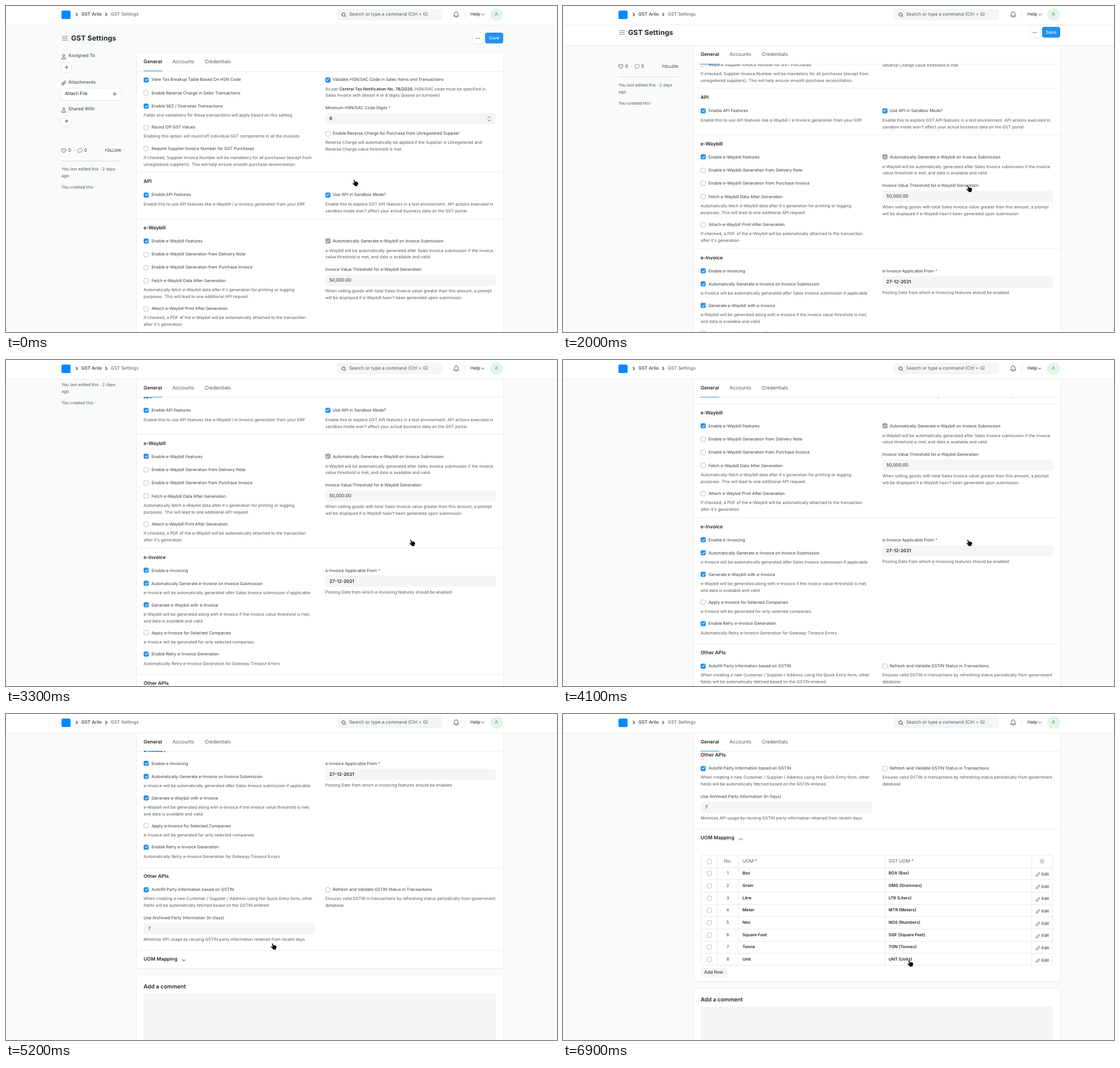
An HTML page that plays this animation: 973x575 px, repeating every 8 s.

```html
<!DOCTYPE html>
<html lang="en">
<head>
<meta charset="utf-8">
<title>GST Settings</title>
<style>
  html, body { margin: 0; width: 100%; height: 100%; overflow: hidden; background: #f9fafa; }
  body { font: 12px/20px Inter, sans-serif; color: #333c44; text-rendering: geometricPrecision; }
  #stage { position: absolute; width: 973px; height: 575px; overflow: hidden; }
  #stage div, #stage span, #stage svg { position: absolute; box-sizing: border-box; }
  /* Text is set at interface size and shown at the zoom of the stage. */
  span { white-space: pre; transform: scale(.614); transform-origin: 0 50%; }
  span b, span i { font-style: normal; font-weight: 500; color: #1f272e; }
  span i { color: #e24c4c; }
  svg { width: 1px; height: 1px; overflow: visible; fill: none; stroke-linecap: round; stroke-linejoin: round; }
  .center { transform: scale(.614) translateX(-50%); }
  .help { color: #505a62; }
  .sm { font-size: 11px; }
  .md { font-size: 13px; }
  .tab { font-size: 14px; }
  .lg { font-size: 16px; }
  .title { font-size: 20px; font-weight: 700; letter-spacing: .01em; color: #1f272e; }
  .dark { color: #1f272e; }
  .white { color: #fff; }
  .green { color: #48a36a; }
  .medium { font-weight: 500; }
  .strong { font-weight: 600; color: #1f272e; }
  .card { background: #fff; border-radius: 5px; box-shadow: 0 0 2px #1f272e26, 0 1px 2px #1f272e0d; }
  .raised { background: #fff; box-shadow: 0 0 1.5px #1f272e33, 0 .5px 1.5px #1f272e1f; }
  .input { background: #f4f5f6; border-radius: 4px; }
  .box { width: 9px; height: 9px; border: .8px solid #b9c0c6; border-radius: 2.5px; background: #fff; }
  .box.on { background: #2490ef; border: 0; }
  .box.off { background: #98a1a9; border: 0; }
</style>
</head>
<body>
<div id="stage">
  <div id="page">
    <div id="sidebar"></div>
    <div id="card" class="card" style="left:231px;top:83px;width:647px"></div>
    <div id="form"></div>
    <div id="table"></div>
    <div id="comments"></div>
  </div>
  <div id="tabs" style="left:231px;width:647px;height:32.5px;background:#fff;border-bottom:.8px solid #ebeef0;border-radius:5px 5px 0 0"></div>
  <div id="head" style="top:33.5px;width:973px;height:47px"></div>
  <div id="nav" style="width:973px;height:34px;background:#fff;border-bottom:1px solid #e9ecee"></div>
  <div id="cursor"></div>
</div>
<script>
const $ = id => document.getElementById(id);
const add = (id, ...parts) => { $(id).innerHTML += parts.join(''); };

const text = (x, y, s, cls = '') => `<span class="${cls}" style="left:${x}px;top:${y - 10}px">${s}</span>`;
const rect = (x, y, w, h, style = '', cls = '') =>
  `<div class="${cls}" style="left:${x}px;top:${y}px;width:${w}px;height:${h}px;${style}"></div>`;
const icon = (x, y, d, color = '#505a62', width = .9, fill = 'none') =>
  `<svg style="left:${x}px;top:${y}px"><path d="${d}" stroke="${color}" stroke-width="${width}" fill="${fill}"/></svg>`;
const rule = y => rect(231, y, 647, .8, 'background:#ebeef0');
const circle = (r, y = 0) => `M${-r} ${y}a${r} ${r} 0 1 0 ${2 * r} 0a${r} ${r} 0 1 0 ${-2 * r} 0`;

const DOWN = 'M-2.5-1.2L0 1.3L2.5-1.2', UP = 'M-3 1.5L0-1.5L3 1.5', RIGHT = 'M-1.2-2.5L1.3 0L-1.2 2.5';
const PLUS = 'M-2.8 0H2.8M0-2.8V2.8';
const PERSON = circle(1.7, -2) + 'M-3.8 4c0-4 7.6-4 7.6 0z';
const required = s => s + ' <i>*</i>';

// Form building blocks for the two columns
const L = 243.2, R = 563.7;
const checkbox = (x, y, state = '') =>
  rect(x, y - 4.5, 9, 9, '', 'box ' + state) +
  (state && icon(x + 4.5, y, 'M-2 .1L-.6 1.5L2.1-1.4', '#fff', 1.1));
const check = (x, y, label, state) => checkbox(x, y, state) + text(x + 13.5, y, label);
const help = (x, y, ...lines) => lines.map((s, i) => text(x, y + i * 11.8, s, 'help')).join('');
const field = (x, y, value, cls = '') => rect(x, y - 10, 301.6, 20, '', 'input') + text(x + 7.4, y, value, 'md dark ' + cls);
const section = (y, s) => text(L, y, s, 'tab strong');

add('nav',
  rect(98, 7.5, 15.5, 15.5, 'background:#0089ff;border-radius:2.5px'),
  icon(124.5, 14.7, RIGHT, '#333c44', 1.1), text(132.5, 14.8, 'GST Arilo', 'md medium'),
  icon(177, 14.7, RIGHT, '#333c44', 1.1), text(185, 14.8, 'GST Settings', 'md help'),
  rect(584, 5, 186, 20, '', 'input'),
  icon(596, 14.5, circle(3) + 'M2.3 2.3L4.3 4.3', '#333c44'),
  text(606, 15, 'Search or type a command (Ctrl + G)', 'md help'),
  icon(794.7, 14.7, 'M-4.3 2.6C-2.8 1-3.3-.5-3-2C-2.4-5.6 2.4-5.6 3-2C3.3-.5 2.8 1 4.3 2.6ZM-1.3 4.2C-.8 5.3.8 5.3 1.3 4.2', '#333c44'),
  rect(810, 9, .8, 12, 'background:#dfe3e6'),
  text(819.5, 14.8, 'Help', 'md dark'), icon(841.5, 15.2, DOWN, '#333c44'),
  rect(855, 3.5, 22.5, 22.5, 'background:#e4f5e9;border-radius:50%'),
  text(866.2, 14.8, 'A', 'tab green center'));

add('head',
  icon(103.8, 23.7, 'M-4.5-3.3H4.5M-4.5 0H4.5M-4.5 3.3H4.5', '#687178'),
  text(115, 23.5, 'GST Settings', 'title'),
  rect(824, 13.5, 18, 19.3, 'border-radius:4px', 'raised'),
  icon(833, 23.5, 'M-2.7 0h0M0 0h0M2.7 0h0', '#1f272e', 1.5),
  rect(846, 13.5, 31.8, 19.3, 'background:#2490ef;border-radius:4px'),
  text(862, 23.4, 'Save', 'md white center'));

add('tabs',
  text(12.2, 16, 'General', 'tab strong'), text(63.2, 16, 'Accounts', 'tab help'), text(120, 16, 'Credentials', 'tab help'),
  rect(12.3, 31.2, 32.7, 1.3, 'background:#2490ef'));

const plusButton = y => rect(97, y - 9.5, 19, 19, 'border-radius:50%', 'raised') + icon(106.5, y, PLUS, '#333c44');
add('sidebar',
  icon(102, 88.5, PERSON), text(110.3, 88.4, 'Assigned To', 'md medium help'), plusButton(108),
  icon(102, 135.5, 'M3.5-1L-.3 2.8C-2.6 5-5 2.3-3 .2L.8-3.4C2.4-4.8 4.2-2.8 2.8-1.4L-.8 2C-1.8 2.8-2.6 1.7-1.8.9L1.2-2'),
  text(110.3, 135.4, 'Attachments', 'md medium help'),
  rect(97, 145.5, 106.3, 20, 'border-radius:4px', 'raised'),
  text(103.5, 155.4, 'Attach File', 'md dark'), icon(192, 155.3, PLUS, '#333c44'),
  icon(102, 182.5, PERSON), text(110.3, 182.4, 'Shared With', 'md medium help'), plusButton(202.5),
  icon(102.3, 254.7, 'M0 3.8L-3.5.3C-5.2-2-2-5 0-2.3C2-5 5.2-2 3.5.3Z', '#333c44'), text(110, 254.6, '0', 'md'),
  text(119.5, 254.6, '·', 'md'),
  icon(131, 254.7, 'M-2.6 3.7L-3 2C-5.6-1-3-3.7 0-3.7C5.3-3.7 5.3 3 0 3L-1 2.9Z', '#687178', .8), text(138, 254.6, '0', 'md'),
  text(174.7, 254.6, 'FOLLOW', 'sm dark'),
  rect(98, 273.2, 105, .9, 'background:#d5dade'),
  text(97.7, 288.4, 'You last edited this · 2 days', 'help'), text(97.7, 299.6, 'ago', 'help'),
  text(97.7, 320.2, 'You created this ·', 'help'));

add('form',
  check(L, 130, 'View Tax Breakup Table Based On HSN Code', 'on'),
  check(L, 153.5, 'Enable Reverse Charge in Sales Transactions'),
  check(L, 176.5, 'Enable SEZ / Overseas Transactions', 'on'),
  help(L, 193, 'Fields and validations for these transactions will apply based on this setting'),
  check(L, 214.2, 'Round Off GST Values'),
  help(L, 230.2, 'Enabling this option will round off individual GST components in all the Invoices'),
  check(L, 251.5, 'Require Supplier Invoice Number for GST Purchases'),
  help(L, 268, 'If checked, Supplier Invoice Number will be mandatory for all purchases (except from',
    'unregistered suppliers). This will help ensure smooth purchase reconciliation.'),
  check(R, 130, 'Validate HSN/SAC Code in Sales Items and Transactions', 'on'),
  help(R, 146.5, 'As per <b>Central Tax Notification No. 78/2020</b>, HSN/SAC code must be specified in',
    'Sales Invoice with atleast 4 or 6 digits (based on turnover)'),
  text(R, 180.2, required('Minimum HSN/SAC Code Digits')),
  field(R, 199, '6', 'strong'),
  icon(853, 199, 'M-2-1.8L0-3.8L2-1.8M-2 1.8L0 3.8L2 1.8', '#333c44'),
  check(R, 225, 'Enable Reverse Charge for Purchase from Unregistered Supplier'),
  help(R, 241.3, 'Reverse Charge will automatically be applied if the Supplier is Unregistered and', 'Reverse Charge value threshold is met.'),

  rule(293.3), section(310, 'API'),
  check(L, 333, 'Enable API Features', 'on'),
  help(L, 349.7, 'Enable this to use API features like e-Waybill / e-Invoice generation from your ERP'),
  check(R, 333, 'Use API in Sandbox Mode?', 'on'),
  help(R, 349.7, 'Enable this to explore GST API features in a test environment. API actions executed in',
    'sandbox mode won\'t affect your actual business data on the GST portal.'),

  rule(375.2), section(392, 'e-Waybill'),
  check(L, 414.7, 'Enable e-Waybill Features', 'on'),
  check(L, 438.3, 'Enable e-Waybill Generation from Delivery Note'),
  check(L, 461.3, 'Enable e-Waybill Generation from Purchase Invoice'),
  check(L, 484.7, 'Fetch e-Waybill Data After Generation'),
  help(L, 500.8, 'Automatically fetch e-Waybill data after it\'s generation for printing or logging',
    'purposes. This will lead to one additional API request.'),
  check(L, 534.3, 'Attach e-Waybill Print After Generation'),
  help(L, 550.3, 'If checked, a PDF of the e-Waybill will be automatically attached to the transaction', 'after it\'s generation'),
  check(R, 414.7, 'Automatically Generate e-Waybill on Invoice Submission', 'off'),
  help(R, 431.5, 'e-Waybill will be automatically generated after Sales Invoice submission if the invoice',
    'value threshold is met, and data is available and valid'),
  text(R, 464.8, 'Invoice Value Threshold for e-Waybill Generation'),
  field(R, 484.3, '50,000.00'),
  help(R, 503.2, 'When selling goods with total Sales Invoice value greater than this amount, a prompt',
    'will be displayed if e-Waybill hasn\'t been generated upon submission'),

  rule(576), section(592.5, 'e-Invoice'),
  check(L, 615.5, 'Enable e-Invoicing', 'on'),
  check(L, 638.8, 'Automatically Generate e-Invoice on Invoice Submission', 'on'),
  help(L, 655, 'e-Invoice will be automatically generated after Sales Invoice submission if applicable'),
  check(L, 676.6, 'Generate e-Waybill with e-Invoice', 'on'),
  help(L, 692.7, 'e-Waybill will be generated along with e-Invoice if the invoice value threshold is met,', 'and data is available and valid'),
  check(L, 725.6, 'Apply e-Invoice for Selected Companies'),
  help(L, 742.2, 'e-Invoice will be generated for only selected companies.'),
  check(L, 763.3, 'Enable Retry e-Invoice Generation', 'on'),
  help(L, 780, 'Automatically Retry e-Invoice Generation for Gateway Timeout Errors'),
  text(R, 616, required('e-Invoice Applicable From')),
  field(R, 635.4, '27-12-2021', 'strong'),
  help(R, 654.4, 'Posting Date from which e-Invoicing features should be enabled'),

  rule(798.8), section(815.4, 'Other APIs'),
  check(L, 838.3, 'Autofill Party Information based on GSTIN', 'on'),
  help(L, 854.4, 'When creating a new Customer / Supplier / Address using the Quick Entry form, other',
    'fields will be automatically fetched based on the GSTIN entered'),
  text(L, 888.2, 'Use Archived Party Information (In Days)'),
  field(L, 907.2, '7'),
  help(L, 926, 'Minimize API usage by reusing GSTIN party information retained from recent days'),
  check(R, 838.3, 'Refresh and Validate GSTIN Status in Transactions'),
  help(R, 854.4, 'Ensures valid GSTIN in transactions by refreshing status periodically from government', 'database'),

  rule(944.5), section(961.4, 'UOM Mapping'),
  '<div id="chevron" style="left:314.3px;top:962.5px">' + icon(0, 0, UP, '#333c44') + '</div>');

const TOP = 991, ROW = 21.67;
const units = [['Box', 'BOX (Box)'], ['Gram', 'GMS (Grammes)'], ['Litre', 'LTR (Liters)'], ['Meter', 'MTR (Meters)'],
  ['Nos', 'NOS (Numbers)'], ['Square Foot', 'SQF (Square Feet)'], ['Tonne', 'TON (Tonnes)'], ['Unit', 'UNT (Units)']];
add('table',
  rect(243.3, TOP, 622, ROW * 9, 'border:.8px solid #e6e9ec;border-radius:4px'),
  [272.3, 309.3, 568, 827].map(x => rect(x, TOP, .8, ROW * 9, 'background:#e6e9ec')).join(''),
  checkbox(253.5, TOP + 11),
  text(291.2, TOP + 11, 'No.', 'md help center'),
  text(316.5, TOP + 11, required('UOM'), 'md help'), text(575, TOP + 11, required('GST UOM'), 'md help'),
  icon(846, TOP + 11, circle(3.5) + circle(1.3), '#98a1a9'),
  units.map(([unit, gst], i) => {
    const y = TOP + ROW * (i + 1) + 11;
    return rect(243.3, y - 11, 622, .8, 'background:#e6e9ec') + checkbox(253.5, y) +
      text(291.2, y - .3, i + 1, 'center') + text(316.5, y - .5, unit, 'strong') + text(575, y - .5, gst, 'strong') +
      icon(839, y + 1.5, 'M-3.3 3.2L-2.8 1.2L1.4-3L3-1.4L-1.2 2.7Z', '#333c44', .8) +
      text(844.5, y + 1.2, 'Edit', 'dark');
  }).join(''),
  rect(243.3, 1190.3, 46.5, 15.6, '', 'input'), text(266.3, 1198.2, 'Add Row', 'md dark center'));

add('comments',
  rect(231, 988.5, 647, 150, '', 'card'),
  text(L, 1008.8, 'Add a comment', 'lg strong'),
  rect(243.3, 1020.8, 621.7, 90, 'border-radius:4px 4px 0 0', 'input'));

add('cursor', icon(0, 0,
  'M-3.6-5.2C-3.2-6.2-1.9-6-1.6-5L-.7-2.2C2-2.6 4.6-2 5-.3C5.4 1.5 4.6 2.6 4 3.6V5.8H-1.5V4.4C-3.3 3.6-4.3 2-5.2.8C-5.4-.2-4.2-.5-3.2.4L-2.3.9Z',
  '#fff', .5, '#000'));

// Motion
const clamp = x => Math.min(1, Math.max(0, x));
const smooth = x => { x = clamp(x); return x * x * (3 - 2 * x); };

const wheel = [[1585, 148.5], [3150, 148.5], [4085, 148.5], [4585, 83], [6185, 148.5], [6785, 148.5]];
const pointer = [[0, 617, 312], [100, 616.5, 312.5], [200, 616.5, 312.5], [700, 564, 219], [1100, 639.5, 291],
  [1300, 719, 330], [1400, 717.5, 322.5], [4700, 717.5, 322.5], [5400, 375, 445], [5500, 380, 450],
  [5700, 380, 450], [6200, 613.5, 442.5], [6600, 613.5, 440], [8000, 613.5, 440]];

function pointerAt(t) {
  const i = pointer.findIndex(p => p[0] > t);
  const [a, b] = [pointer[i - 1], pointer[i]];
  const k = (t - a[0]) / (b[0] - a[0]);
  return [a[1] + (b[1] - a[1]) * k, a[2] + (b[2] - a[2]) * k];
}

function draw() {
  // The screen updates ten times a second and rests after 6.9 s.
  const t = Math.min(6900, Math.floor(performance.now() % 8000 / 100) * 100);
  const scroll = wheel.reduce((sum, [start, amount]) => sum + amount * smooth((t - start) / 250), 0);
  const hide = smooth((t - 1850) / 500);
  const open = t >= 5800;
  const [x, y] = pointerAt(t);

  $('page').style.transform = `translateY(${-scroll}px)`;
  $('tabs').style.top = Math.max(83 - scroll, 80.5 - 47 * hide) + 'px';
  $('head').style.transform = `translateY(${-48 * hide}px)`;
  $('head').style.background = scroll ? '#fff' : 'none';
  $('head').style.borderBottom = scroll ? '.8px solid #e6e9ec' : '0';
  $('card').style.height = (open ? 1131 : 893.5) + 'px';
  $('table').style.display = open ? 'block' : 'none';
  $('chevron').style.transform = open ? 'none' : 'scaleY(-1)';
  $('comments').style.top = open ? '237.5px' : '0';
  $('cursor').style.transform = `translate(${x}px, ${y}px)`;
  requestAnimationFrame(draw);
}
draw();
</script>
</body>
</html>
```
